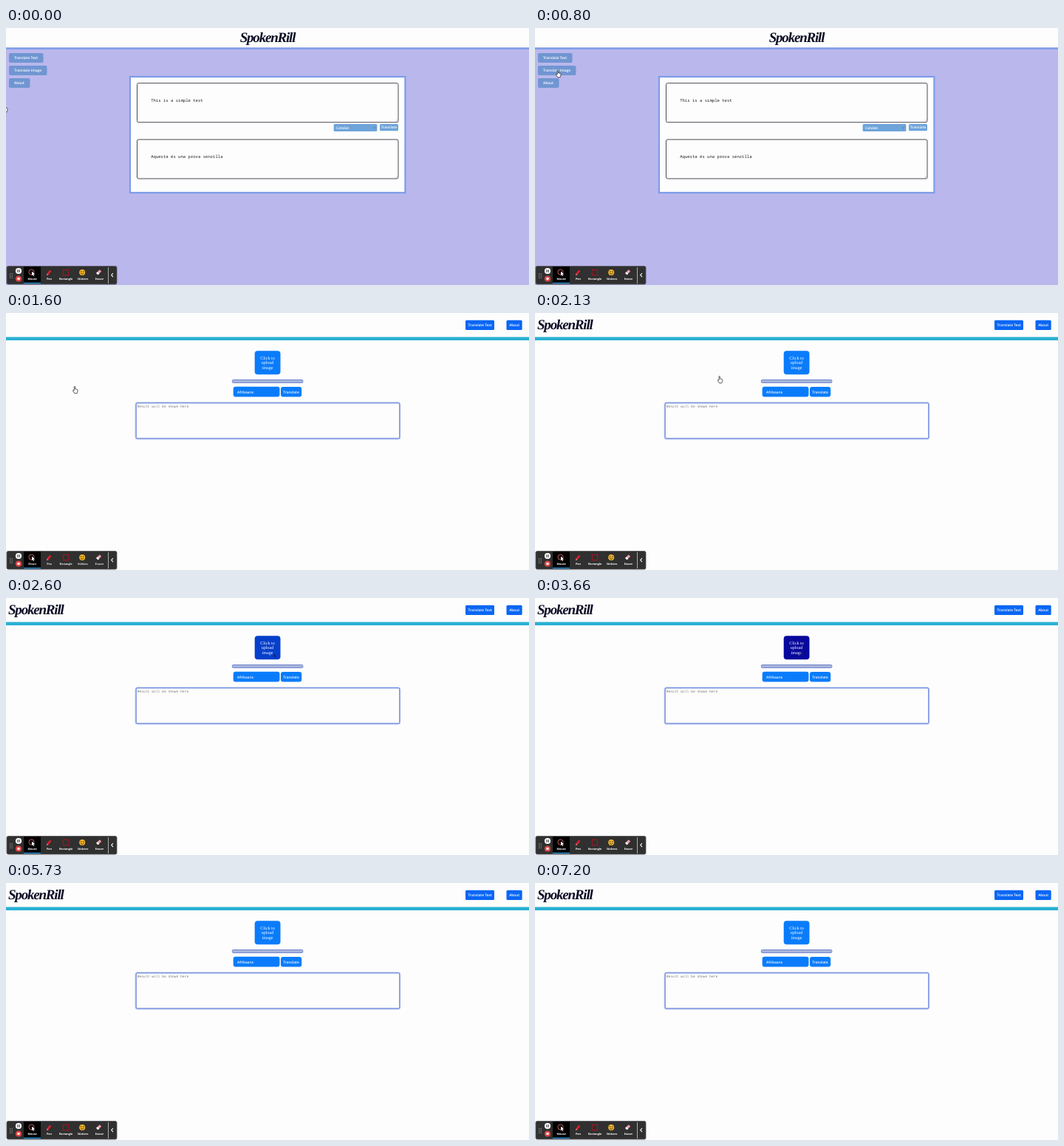
An HTML page that plays this animation: 708 by 348 pixels, repeating every 8000 ms.

```html
<!DOCTYPE html>
<html lang="en">
<head>
<meta charset="utf-8">
<title>Translator demo</title>
<style>
html, body { margin: 0; width: 100%; height: 100%; overflow: hidden; background: #fdfdfd; }
svg { display: block; width: 708px; height: 348px; }
text { font: 600 4.8px "Open Sans", sans-serif; fill: #fff; text-rendering: geometricPrecision; }
.mid { text-anchor: middle; }
.logo { font: italic 700 19px "Liberation Serif", serif; letter-spacing: -1.2px; fill: #0b0b24; }
.mono { font: 400 5.6px "Noto Sans Mono", monospace; fill: #222; }
.hint { font: 400 4.63px "Liberation Mono", monospace; fill: #757575; }
.upload text { font: 400 6.1px "Liberation Serif", serif; }
.label text { font: 700 3.7px "Open Sans", sans-serif; text-anchor: middle; }
.label.serif text { font: 700 4px "Liberation Serif", serif; }
.field { fill: #fdfdfd; stroke: #4a4a55; }
.soft { fill: #7096d2; }
.pale { fill: #6ea4da; }
.nav { fill: #0a66f4; }
.main { fill: #0a7cfb; }

/* 8 s timeline: the page swaps at 20%, late parts settle at 20.8% */
.page1, .page2, .late, .early, .flash, .hand, .arrow { animation: 8s step-end infinite; }
.page1 { animation-name: before; }
.page2 { animation-name: after; }
.late { animation-name: settled; }
.early { animation-name: notFlash; }
.flash { animation-name: flash; }
.hand { animation-name: handShown; }
.arrow { animation-name: arrowShown; }
@keyframes before { 0% { visibility: visible } 20%, 100% { visibility: hidden } }
@keyframes after { 0% { visibility: hidden } 20%, 100% { visibility: visible } }
@keyframes settled { 0% { visibility: hidden } 20.8%, 100% { visibility: visible } }
@keyframes flash { 0% { visibility: hidden } 20% { visibility: visible } 20.8%, 100% { visibility: hidden } }
@keyframes notFlash { 0% { visibility: visible } 20% { visibility: hidden } 20.8%, 100% { visibility: visible } }
@keyframes handShown { 0% { visibility: visible } 31.2%, 100% { visibility: hidden } }
@keyframes arrowShown { 0% { visibility: hidden } 31.2% { visibility: visible } 65.75%, 100% { visibility: hidden } }

.handMove { animation: handMove 8s ease-in-out infinite; }
@keyframes handMove {
  0%, 1% { transform: translate(-5px, 104px) }
  8%, 12% { transform: translate(28px, 57px) }
  18%, 22% { transform: translate(90px, 99px) }
  30.5%, 100% { transform: translate(361px, 75px) }
}
.arrowMove { animation: arrowMove 8s ease-in-out infinite; }
@keyframes arrowMove {
  0%, 33% { transform: translate(362.5px, 75px) }
  40%, 49% { transform: translate(359.5px, 71.5px) }
  56%, 100% { transform: translate(357.3px, 68.5px) }
}
.press { fill: #0a7cfb; animation: press 8s linear infinite; }
@keyframes press {
  0%, 29% { fill: #0a7cfb }
  32%, 41% { fill: #063fcb }
  43.5%, 50% { fill: #08089c }
  53.5%, 100% { fill: #0a7cfb }
}
</style>
</head>
<body>
<svg viewBox="0 0 708 348">
  <g class="page1">
    <rect width="708" height="348" fill="#bab7ec"/>
    <rect width="708" height="26.5" fill="#fdfdfd"/>
    <rect y="26.5" width="708" height="2.4" fill="#7c9de8"/>
    <text class="logo mid" x="354" y="19">SpokenRill</text>

    <g class="soft">
      <rect x="4" y="34" width="46.5" height="13" rx="2"/>
      <rect x="4" y="51" width="51.5" height="13" rx="2"/>
      <rect x="4" y="68" width="28.5" height="13" rx="2"/>
    </g>
    <text class="mid" x="27" y="42.3">Translate Text</text>
    <text class="mid" x="29.5" y="59.3">Translate Image</text>
    <text class="mid" x="18" y="76.3">About</text>

    <rect x="168" y="66" width="372.4" height="157" fill="#fdfdfd" stroke="#7c9de8" stroke-width="2.2"/>
    <rect class="field" x="177.5" y="74.7" width="353.5" height="53" rx="2"/>
    <rect class="field" x="177.5" y="151" width="353.5" height="53" rx="2"/>
    <path d="M527.5 126.5l2.5-2.5M527.5 202.8l2.5-2.5" stroke="#888" stroke-width=".6"/>
    <text class="mono" x="196.2" y="100">This is a simple test</text>
    <text class="mono" x="196.2" y="176">Aquesta és una prova senzilla</text>

    <rect class="pale" x="443.6" y="130" width="58.8" height="10" rx="1.5"/>
    <rect class="pale" x="506" y="130" width="25" height="9.2" rx="1.5"/>
    <path d="M497.5 134.5l1.3 1.3 1.3-1.3" fill="none" stroke="#345" stroke-width=".6"/>
    <text x="447" y="136.8">Catalan</text>
    <text class="mid" x="518.5" y="136.4">Translate</text>
  </g>

  <g class="page2">
    <rect width="708" height="348" fill="#fdfdfd"/>
    <rect y="32.5" width="708" height="4.5" fill="#2bb0d3"/>
    <rect class="nav" x="622" y="9.7" width="39" height="13.3" rx="1.6"/>
    <rect class="nav" x="677.5" y="9.7" width="21.2" height="13.3" rx="1.6"/>
    <text class="mid" x="641.7" y="18">Translate Text</text>
    <text class="mid" x="688.2" y="18">About</text>

    <g class="upload">
      <rect class="press" x="336.7" y="51.3" width="34.8" height="32" rx="4"/>
      <text class="mid" x="354" y="62.6">Click to</text>
      <text class="mid" x="354" y="69.4">upload</text>
      <text class="mid" x="354" y="76.2">image</text>
    </g>

    <rect x="306.4" y="90.5" width="95.4" height="4" rx="1" fill="#a9b4dc" stroke="#7088d0"/>
    <rect class="main" x="307.7" y="99.8" width="62.8" height="13.8" rx="3"/>
    <rect class="main" x="372" y="100" width="28.2" height="13.4" rx="3"/>
    <text x="313" y="108.5">Afrikaans</text>
    <text class="mid" x="386" y="108.5">Translate</text>

    <rect x="175.6" y="121.4" width="357.6" height="49" rx="2.5" fill="#fdfdfd" stroke="#b9c3f0" stroke-width="2"/>
    <rect x="176.2" y="121.8" width="356.6" height="48" rx="2" fill="none" stroke="#6685dc"/>
    <text class="hint" x="177.8" y="127.8">Result will be shown here</text>
  </g>
  <text class="logo late" x="3" y="22">SpokenRill</text>

  <g class="toolbar">
    <rect x="1" y="322.5" width="149" height="24.5" rx="2" fill="#303030" stroke="#55555c" stroke-width=".8"/>
    <path d="M5.7 332v7M8.2 332v7" stroke="#aaa" stroke-width="1" stroke-dasharray="1 1"/>
    <circle cx="17" cy="329" r="4.1" fill="#fff"/>
    <path d="M15.9 327.2v3.6M18.1 327.2v3.6" stroke="#222" stroke-width="1"/>
    <circle cx="17" cy="339.5" r="4.1" fill="#dc4444"/>
    <rect x="15.5" y="338" width="3" height="3" fill="#fff"/>

    <rect x="24" y="323" width="23" height="23" fill="#000"/>
    <rect x="24" y="344.8" width="23" height="1.3" fill="#2a9be0"/>
    <circle cx="34.5" cy="330.6" r="3.6" fill="none" stroke="#d86a6a" stroke-width=".9"/>
    <path d="M35 329.5l4.2 3.9-2 .2 1 1.8-1 .5-.9-1.9-1.3 1.2z" fill="#fff"/>

    <path d="M56.3 333.5l4-5" stroke="#e0202c" stroke-width="2.8"/>
    <path d="M55 335.2l.6-2.6 1.9 1.5z" fill="#f08088"/>
    <rect x="77.4" y="327.3" width="7.4" height="7.4" fill="none" stroke="#a81420" stroke-width="1"/>
    <circle cx="103.2" cy="331" r="4" fill="#f3b62c"/>
    <path d="M100.5 330h2.2M103.8 330h2.2M101 332.2q2.2 2.4 4.4 0" fill="none" stroke="#4c3210" stroke-width=".9"/>
    <path d="M123.5 333l4.4-4.6" stroke="#f0a0ac" stroke-width="3.4"/>
    <path d="M123.3 333.2l1.6-1.7" stroke="#fff" stroke-width="3.4"/>
    <path d="M138.5 324v22" stroke="#ccc" stroke-width=".8"/>
    <path d="M145 332l-2.3 2.6 2.3 2.6" fill="none" stroke="#fff" stroke-width="1.1"/>

    <g class="label early">
      <text x="35.7" y="340.8">Mouse</text>
      <text x="58.5" y="340.8">Pen</text>
      <text x="81" y="340.8">Rectangle</text>
      <text x="104" y="340.8">Stickers</text>
      <text x="126.5" y="340.8">Eraser</text>
    </g>
    <g class="label serif flash">
      <text x="35.7" y="340.8">Mouse</text>
      <text x="58.5" y="340.8">Pen</text>
      <text x="81" y="340.8">Rectangle</text>
      <text x="104" y="340.8">Stickers</text>
      <text x="126.5" y="340.8">Eraser</text>
    </g>
  </g>

  <g class="hand"><g class="handMove">
    <path d="M2.2 6V1.2q0-.8.7-.8t.7.8v2.6l2.6.6q1 .3.9 1.3l-.5 2.6-.6 1.5H2.8L.6 6.4q-.3-.8.4-.9z" fill="#fff" stroke="#222" stroke-width=".75"/>
  </g></g>
  <g class="arrow"><g class="arrowMove">
    <path d="M0 0l.2 5 1.1-1 1.1 2.4.9-.4-1.1-2.3h1.5z" fill="#14206a"/>
  </g></g>
</svg>
</body>
</html>
```
